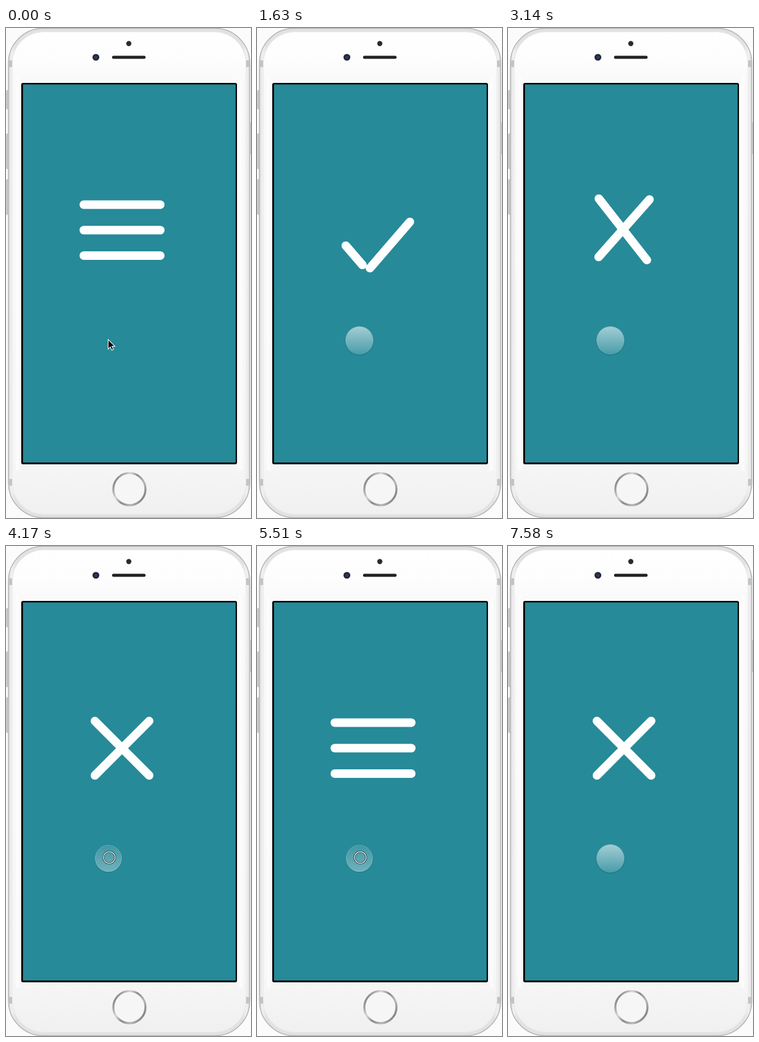
These frames come from a looping animation (402 by 803 pixels, 8 s). An HTML page:

```html
<!DOCTYPE html>
<html lang="en">
<head>
<meta charset="utf-8">
<title>Menu icon morph</title>
<style>
html, body { margin: 0; width: 100%; height: 100%; overflow: hidden; background: #fbfbfb; }
svg { display: block; width: 100%; height: 100%; }
</style>
</head>
<body>
<svg viewBox="0 0 402 803" preserveAspectRatio="none">
  <defs>
    <linearGradient id="face" x1="0" y1="0" x2="0" y2="1">
      <stop offset="0" stop-color="#fff"/>
      <stop offset=".06" stop-color="#fdfdfd"/>
      <stop offset=".1" stop-color="#f9f9f9"/>
      <stop offset=".88" stop-color="#f7f7f7"/>
      <stop offset="1" stop-color="#f0f0f0"/>
    </linearGradient>
    <linearGradient id="rim" x1="0" x2="1" y1="0" y2="0">
      <stop offset="0" stop-color="#dcdcdc"/>
      <stop offset=".012" stop-color="#f1f1f1"/>
      <stop offset=".03" stop-color="#e2e2e2"/>
      <stop offset=".97" stop-color="#e2e2e2"/>
      <stop offset=".988" stop-color="#f1f1f1"/>
      <stop offset="1" stop-color="#dcdcdc"/>
    </linearGradient>
    <linearGradient id="home" x1="0" y1=".2" x2="1" y2=".8">
      <stop offset="0" stop-color="#777"/>
      <stop offset=".3" stop-color="#d8d8d8"/>
      <stop offset=".5" stop-color="#8a8a8a"/>
      <stop offset=".75" stop-color="#b8b8b8"/>
      <stop offset="1" stop-color="#777"/>
    </linearGradient>
    <linearGradient id="button" x1="0" x2="1" y1="0" y2="0">
      <stop offset="0" stop-color="#a0a0a0"/>
      <stop offset=".5" stop-color="#e4e4e4"/>
      <stop offset="1" stop-color="#b4b4b4"/>
    </linearGradient>
    <linearGradient id="glass" x1="0" y1="0" x2="0" y2="1">
      <stop offset="0" stop-color="#fff" stop-opacity=".58"/>
      <stop offset="1" stop-color="#fff" stop-opacity=".16"/>
    </linearGradient>
    <linearGradient id="pressed" x1="0" y1="0" x2="0" y2="1">
      <stop offset="0" stop-color="#fff" stop-opacity=".12"/>
      <stop offset="1" stop-color="#fff" stop-opacity=".34"/>
    </linearGradient>
  </defs>

  <rect width="402" height="803" fill="#fbfbfb"/>
  <g fill="url(#button)" stroke="#a9a9a9" stroke-width=".6">
    <rect x="1" y="102" width="4" height="31" rx="1.5"/>
    <rect x="1" y="173" width="4" height="58" rx="1.5"/>
    <rect x="1" y="248" width="4" height="58" rx="1.5"/>
    <rect x="398.5" y="155" width="4" height="51" rx="1.5"/>
  </g>
  <rect x="4" y=".5" width="396" height="802" rx="57" fill="url(#rim)" stroke="#b3b3b3" stroke-width="1.5"/>
  <g fill="#c3c3c3">
    <rect x="4" y="53" width="6" height="11"/>
    <rect x="394" y="53" width="6" height="11"/>
    <rect x="4" y="739" width="6" height="11"/>
    <rect x="394" y="739" width="6" height="11"/>
  </g>
  <rect x="10.5" y="6.5" width="383" height="790" rx="51" fill="url(#face)" stroke="#ececec"/>
  <path d="M19 80V725M385 80V725" fill="none" stroke="#fff" stroke-width="6" opacity=".6"/>

  <circle cx="201.5" cy="25.5" r="4.2" fill="#2a2a2a"/>
  <circle cx="147.5" cy="48" r="5.6" fill="#25272f"/>
  <circle cx="147.5" cy="48" r="2.6" fill="#243a70"/>
  <rect x="174" y="45.5" width="55" height="5" rx="2.2" fill="#222"/>
  <circle cx="202.5" cy="755.7" r="26.3" fill="#f6f6f6" stroke="url(#home)" stroke-width="3.4"/>

  <rect x="25" y="90" width="354" height="625" rx="3" fill="#050505"/>
  <rect x="28" y="92.5" width="348.8" height="619.5" fill="#268a99"/>

  <g id="bars" stroke="#fff" stroke-width="14" stroke-linecap="round"><line/><line/><line/></g>

  <path id="arrow" d="M167.6 510.5v15.6l3.6-3.4 2.3 5.3 2.7-1.2-2.3-5.2h4.7z" fill="#000" stroke="#fff" stroke-width="1.1"/>
  <g id="idle">
    <circle cx="168" cy="513" r="23.3" fill="none" stroke="#0b4a55" stroke-opacity=".3"/>
    <circle cx="168" cy="512" r="23" fill="url(#glass)"/>
  </g>
  <g id="press">
    <circle cx="168" cy="512.6" r="22" fill="none" stroke="#0b4a55" stroke-opacity=".3"/>
    <circle cx="168" cy="512" r="21.6" fill="url(#pressed)" stroke="#fff" stroke-opacity=".35" stroke-width=".9"/>
    <circle cx="169.5" cy="510.5" r="9.6" fill="none" stroke="#152f35" stroke-width="2.8"/>
    <circle cx="169.5" cy="510.5" r="9.6" fill="none" stroke="#fff" stroke-width="1.3"/>
  </g>
</svg>
<script>
const LOOP = 8000;
const byId = id => document.getElementById(id);
const lines = [...byId('bars').children];

// Each bar: centre x, centre y, length, angle, opacity
const burger = [[190.4, 289.5, 125.5, 0, 1], [190.4, 331.3, 125.5, 0, 1], [190.4, 373, 125.5, 0, 1]];
const check = [[215.7, 350, 102.5, -45, 1], [162, 369, 49, 45, 1], [190.4, 373, 125.5, 0, 0]];
const cross = [[190.4, 331.4, 126, 45, 1], [190.4, 331.4, 125.5, 0, 0], [190.4, 331.4, 126, -45, 1]];

const morphs = [
  { at: 1460, from: burger, to: check },
  { at: 2910, from: check, to: cross },
  { at: 4350, from: cross, to: burger },
  { at: 5680, from: burger, to: check },
  { at: 7010, from: check, to: cross }
];
const presses = [[1290, 1460], [2740, 2910], [4170, 4350], [5510, 5630], [6840, 7010]];

// Underdamped spring from 0 to 1
function spring(ms) {
  if (ms <= 0) return 0;
  const s = ms / 1000, decay = 12, freq = 16.5;
  return 1 - Math.exp(-decay * s) * (Math.cos(freq * s) + decay / freq * Math.sin(freq * s));
}

const mix = (a, b, k) => a + (b - a) * k;

function drawBar(line, a, b, k) {
  const [x, y, length, angle] = a.map((v, i) => mix(v, b[i], k));
  const rad = angle * Math.PI / 180;
  const dx = Math.cos(rad) * length / 2, dy = Math.sin(rad) * length / 2;
  line.setAttribute('x1', x - dx);
  line.setAttribute('y1', y - dy);
  line.setAttribute('x2', x + dx);
  line.setAttribute('y2', y + dy);
  line.setAttribute('opacity', mix(a[4], b[4], Math.min(1, k * 1.4)));
}

const show = (id, on) => byId(id).setAttribute('visibility', on ? 'visible' : 'hidden');

function render(t) {
  const morph = morphs.filter(m => t >= m.at).pop() || morphs[0];
  const k = spring(t - morph.at);
  lines.forEach((line, i) => drawBar(line, morph.from[i], morph.to[i], k));

  const touching = t >= 1200;
  const down = presses.some(([start, end]) => t >= start && t < end);
  show('arrow', !touching);
  show('idle', touching && !down);
  show('press', down);
}

const origin = performance.now();
function tick() {
  render((performance.now() - origin) % LOOP);
  requestAnimationFrame(tick);
}
tick();
</script>
</body>
</html>
```
